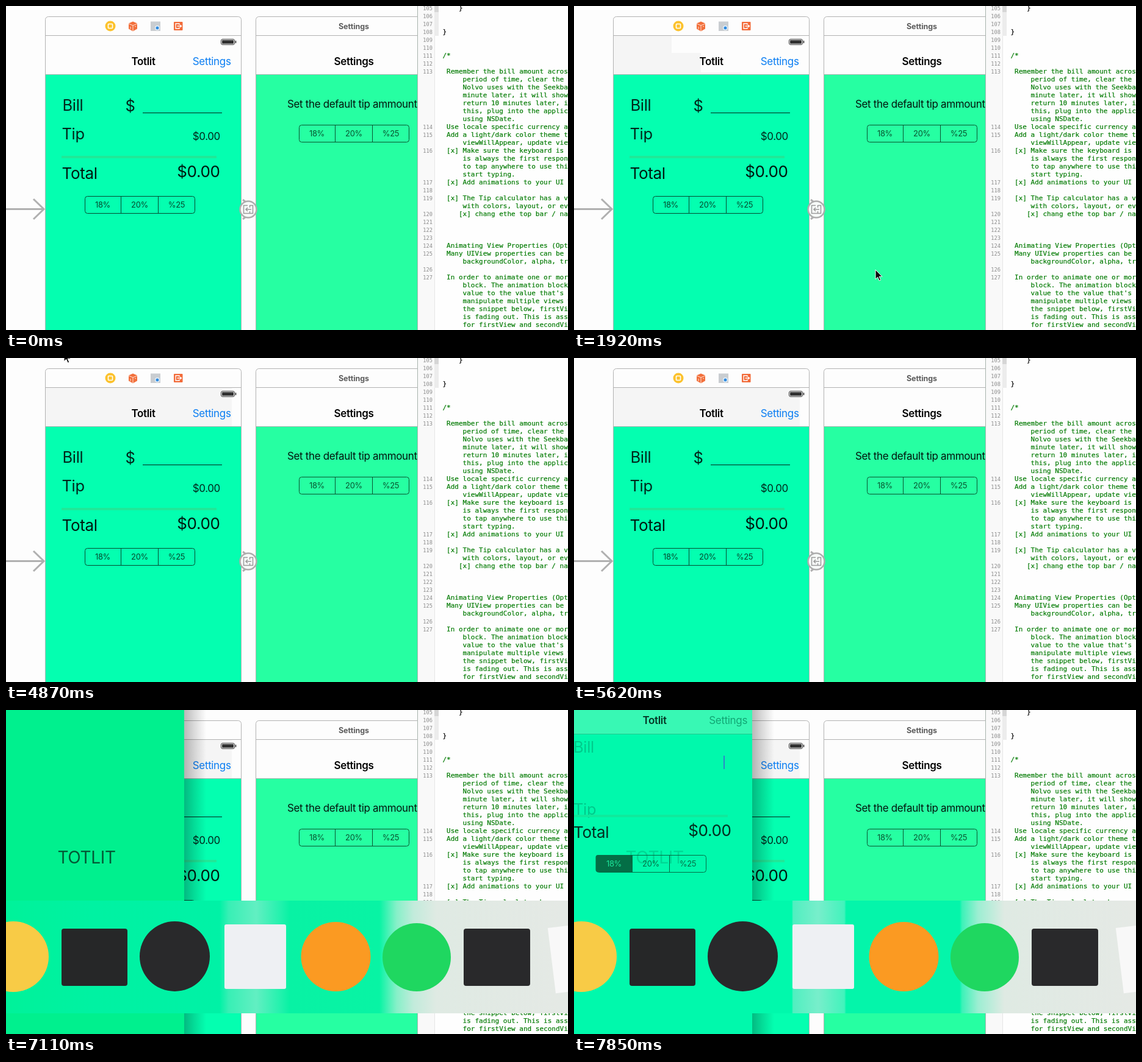
Write an HTML page that moves like this. It is 921 px wide and 532 px high and loops after 7.99 s.

```html
<!DOCTYPE html>
<html lang="en">
<head>
<meta charset="utf-8">
<title>Tip calculator storyboard</title>
<style>
  html, body { margin: 0; width: 100%; height: 100%; overflow: hidden; background: #fdfdfd; }
  svg { display: block; position: absolute; left: 0; top: 0; }
  text { font-family: Inter, "Open Sans", sans-serif; letter-spacing: -.35px; white-space: pre; }
  .code { font: 11px "DejaVu Sans Mono", monospace; letter-spacing: 0; fill: #007a00; stroke: #007a00; stroke-width: .2px; }
  .num { font: 8.7px "DejaVu Sans Mono", monospace; letter-spacing: 0; fill: #8c8c8c; }
  .bold { font-weight: 600; }
  .header { font-weight: 700; letter-spacing: -.1px; }
</style>
</head>
<body>
<svg id="stage" width="921" height="532" viewBox="0 0 921 532"></svg>
<script>
const LOOP = 7990;
const INK = '#00261a';

const rect = (x, y, w, h, fill, extra = '') =>
  `<rect x="${x}" y="${y}" width="${w}" height="${h}" fill="${fill}" ${extra}/>`;
const circle = (x, y, r, fill, extra = '') =>
  `<circle cx="${x}" cy="${y}" r="${r}" fill="${fill}" ${extra}/>`;
const path = (d, stroke, width = 1, fill = 'none', extra = '') =>
  `<path d="${d}" stroke="${stroke}" stroke-width="${width}" fill="${fill}" ${extra}/>`;
const text = (x, y, size, str, fill = INK, anchor = 'start', cls = '') =>
  `<text x="${x}" y="${y}" font-size="${size}" fill="${fill}" text-anchor="${anchor}" class="${cls}">${str}</text>`;
const group = (id, body, extra = '') => `<g id="${id}" ${extra}>${body}</g>`;
const gradient = (id, stops, width = 921) =>
  `<linearGradient id="${id}" gradientUnits="userSpaceOnUse" x1="0" y1="0" x2="${width}" y2="0">` +
  stops.map(([x, color]) => `<stop offset="${x / width}" stop-color="${color}"/>`).join('') +
  '</linearGradient>';

function segments(x, y, ink, selected) {
  const first = selected
    ? path(`M${x + 59.5} ${y}v28h-56a4 4 0 0 1-4-4v-20a4 4 0 0 1 4-4z`, 'none', 0, ink) : '';
  const labels = ['18%', '20%', '%25'].map((s, i) =>
    text(x + 29.5 + i * 60.5, y + 18.8, 13, s, selected && !i ? '#1de69b' : ink, 'middle')).join('');
  return first + rect(x + .5, y + .5, 180, 28, 'none', `rx="4" stroke="${ink}"`) +
    path(`M${x + 59.5} ${y}v29M${x + 120.5} ${y}v29`, ink) + labels;
}

function sceneFrame(x, width, green) {
  return path(`M${x} 532V22.5a5 5 0 0 1 5-5h${width - 10}a5 5 0 0 1 5 5V532`, '#b2b2b2', 1, '#fdfdfd') +
    path(`M${x} 48.5h${width}`, '#b2b2b2') +
    rect(x + .5, 113, width - 1, 419, green);
}
const navLine = (x, width) => path(`M${x} 112.5h${width}`, '#b2b2b2');

const toolbar =
  circle(171, 33, 8.5, '#fcc22d') +
  rect(167.5, 29.5, 7, 7, '#fcc22d', 'stroke="#fff" stroke-width="1.6" rx="1"') +
  path('M208 25.5l7 3v9l-7 4-7-4v-9z', 'none', 0, '#f2703c') +
  path('M201 29l7 3 7-3M208 32v9M204 34v4M211 34l2-1', '#ffe3d6') +
  rect(237, 25.5, 16, 15.5, '#c9cdd1') +
  circle(248, 36, 3.2, '#2f8be0', 'stroke="#e7f2fb" stroke-width="1.4"') +
  rect(275, 26, 14.5, 14, '#f26a38', 'rx="1"') +
  path('M284 31v-2h-6v8h6v-2M280.5 33h7M285.5 31l2 2-2 2', '#fff', 1.3);

const battery =
  rect(352.5, 54.5, 22, 9, '#fff', 'rx="2.5" stroke="#333"') +
  rect(354, 56, 19, 6, '#333', 'rx="1"') +
  path('M376.5 57v4', '#333', 1.5);

const navTint = '#f5f5f5';
const tipScene =
  sceneFrame(64.5, 321, '#04ffb0') +
  [[65, 49, 95, 64, 1], [160, 77, 48, 36, 2], [208, 109, 65, 4, 3],
   [249, 49, 121, 64, 20], [203, 49, 46, 64, 21], [160, 49, 43, 64, 22]]
    .map(([x, y, w, h, from]) => rect(x, y, w, h, navTint, `data-from="${from}"`)).join('') +
  navLine(64.5, 321) + toolbar + battery +
  text(225, 97, 17, 'Totlit', '#000', 'middle', 'bold') +
  text(368.5, 97, 17, 'Settings', '#0a7df2', 'end') +
  text(92.5, 172, 25.5, 'Bill') + text(195.5, 173, 25.5, '$') +
  path('M224 175.5h130', INK) +
  text(91.5, 219, 25.5, 'Tip') + text(351, 220, 17, '$0.00', INK, 'end') +
  rect(91, 246, 254, 4, '#20e898') +
  text(91.5, 283.5, 26, 'Total', '#001a10') +
  text(350.5, 281, 26, '$0.00', '#001a10', 'end') +
  segments(129, 312, '#044a2f');

const settingsScene =
  sceneFrame(409.5, 321, '#26ffa2') + navLine(409.5, 321) +
  text(570, 38, 12.5, 'Settings', '#5c5c5c', 'middle', 'header') +
  text(570, 97, 17, 'Settings', '#000', 'middle', 'bold') +
  text(461, 166.5, 17, 'Set the default tip ammount', '#03140c') +
  segments(480, 195, '#085430');

const connectors =
  path('M0 333.5h60M45 317l17 16.5-17 16.5', '#b0b0b0', 3) +
  path('M388 318l4 3M388 350l4-3', '#b0b0b0', 3) +
  circle(397, 334, 13.5, '#f7faf8', 'stroke="#adadad" stroke-width="2.5"') +
  path('M396 327.5h-6.5v13h15v-13h-5M393 334h9M396 331l-3 3 3 3M399.5 327v4M399.5 337v4', '#9b9b9b', 1.5);

// Each entry: line number (0 for a wrapped line), column, text
const lines = [
  [105, 4, '}'], [106], [107], [108, 0, '}'], [109], [110], [111, 0, '/*'], [112],
  [113, 1, 'Remember the bill amount across'], [0, 5, 'period of time, clear the b'],
  [0, 5, 'Nolvo uses with the Seekbar'], [0, 5, 'minute later, it will show '],
  [0, 5, 'return 10 minutes later, it'], [0, 5, 'this, plug into the applica'],
  [0, 5, 'using NSDate.'], [114, 1, 'Use locale specific currency an'],
  [115, 1, 'Add a light/dark color theme to'], [0, 5, 'viewWillAppear, update view'],
  [116, 1, '[x] Make sure the keyboard is a'], [0, 5, 'is always the first respond'],
  [0, 5, 'to tap anywhere to use this'], [0, 5, 'start typing.'],
  [117, 1, '[x] Add animations to your UI'], [118],
  [119, 1, '[x] The Tip calculator has a vi'], [0, 5, 'with colors, layout, or eve'],
  [120, 4, '[x] chang ethe top bar / nav'], [121], [122], [123],
  [124, 1, 'Animating View Properties (Opti'], [125, 1, 'Many UIView properties can be a'],
  [0, 5, 'backgroundColor, alpha, tra'], [126], [127, 1, 'In order to animate one or more'],
  [0, 5, 'block. The animation block '], [0, 5, 'value to the value that\'s s'],
  [0, 5, 'manipulate multiple views w'], [0, 5, 'the snippet below, firstVie'],
  [0, 5, 'is fading out. This is assu'], [0, 5, 'for firstView and secondVie']
];

const editor =
  rect(674, 0, 247, 532, '#fefefe') + rect(675, 0, 27, 532, '#f9f9f9') +
  path('M674.5 0v532', '#a8b3ad') + path('M702.5 0v532', '#e6e6e6') +
  rect(702, 0, 7, 49, '#ececec') + rect(702, 0, 7, 10, '#d6d6d6') +
  lines.map(([num, col = 0, str = ''], i) => {
    const y = 7 + 13 * i;
    return (num ? text(699, y - .4, '', num, '', 'end', 'num') : '') +
      `<text class="code" x="${715.5 + col * 6.62}" y="${y}" ${str === '}' ? 'style="fill:#000;stroke:#000"' : ''}>${str}</text>`;
  }).join('');

const APP_GREEN = '#00f9ac';
const simApp =
  rect(0, 0, 292, 532, APP_GREEN) + rect(0, 0, 292, 39, '#38f8b4') +
  path('M0 39.5h292', '#22c98f') +
  text(132, 23, 17, 'Totlit', '#053524', 'middle', 'bold') +
  text(284, 23, 17, 'Settings', '#12a674', 'end') +
  `<g opacity=".22">${text(-1, 70, 25.5, 'Bill')}${text(-1, 172, 25.5, 'Tip')}</g>` +
  rect(0, 172, 252, 4, '#10e99c') +
  path('M246 75v22', '#2d87c8', 2) +
  text(-1, 210, 26, 'Total', '#032e1f') + text(257.5, 207, 26, '$0.00', '#032e1f', 'end') +
  segments(36, 238, '#046e46', true);

const simulator =
  rect(292, 0, 36, 532, 'url(#shade)') + rect(0, 0, 292, 532, '#00f08e') +
  group('app', simApp) +
  group('splash', text(132, 251.5, 28, 'TOTLIT', '#045a36', 'middle'));

const paleEnd = [[705, '#dfeae3'], [921, '#e5e9e5']];
const softEdge = [[612, '#08f4a4'], [640, '#86f0c8'], [668, '#c2ebdb'], ...paleEnd];
const defs =
  gradient('dock0', [[0, '#f1f8f4'], [35, '#e3f7ed'], [75, '#62f3be'], [105, '#00f0aa'], [335, '#00f0aa'],
    [362, '#60f3c5'], [400, '#9ff5d8'], [445, '#4df3ba'], [462, '#08f2a4'], ...softEdge]) +
  gradient('dock1', [[0, '#00f29a'], [140, '#00f2a2'], [350, '#00f2a6'], [365, '#38efb5'],
    [410, '#62efc2'], [450, '#22f2ad'], [465, '#08f2a4'], ...softEdge]) +
  gradient('dock2', [[0, APP_GREEN], [357, APP_GREEN], [359, '#50efc0'], [400, '#78eecb'],
    [443, '#42f3bc'], [446, '#04f5aa'], [632, '#04f5aa'], [636, '#3cf2b8'], [662, '#9ceed2'], ...paleEnd]) +
  '<linearGradient id="shade"><stop stop-opacity=".27"/><stop offset=".45" stop-opacity=".14"/>' +
  '<stop offset="1" stop-opacity="0"/></linearGradient>';

const dock =
  rect(0, 313, 921, 185, 'url(#dock0)', 'id="dockBack"') +
  circle(12, 405, 58, '#f8cb46') +
  rect(91, 359, 108, 94, '#262728', 'rx="4"') +
  circle(276.5, 404.5, 57.5, '#29292b') +
  rect(358, 352, 101, 106, '#eef0f3', 'rx="3"') +
  circle(540.5, 405, 57, '#fb9a22') +
  circle(673, 406, 56, '#1fd760') +
  rect(750, 359, 109, 94, '#29292b', 'rx="4"') +
  rect(894, 352, 100, 108, '#f8f8f8', 'transform="rotate(-7 940 406)"');

const pointer = path('M0 0V15.5L3.7 12.2 6.2 18 8.7 17 6.2 11.2H11Z', '#fff', 1, '#0a0a0a');

const $ = id => document.getElementById(id);
$('stage').innerHTML = `<defs>${defs}</defs>` + rect(0, 0, 921, 532, '#fdfdfd') +
  tipScene + settingsScene + connectors + editor +
  group('ghost', pointer, 'transform="translate(252 64)"') + group('cursor', pointer) +
  group('simulator', simulator) + group('dock', dock);

const STEP = 147.6;
const trail = [
  [64, 42], [141, 80], [189, 112], [254, 160], [276, 195], [293, 222], [305, 246], [313, 265],
  [340, 292], [376, 325], [421, 367], [466, 408], [494, 433], [495, 433], [495, 433], [496, 433],
  [516, 441], [510, 425], [450, 300], [351, 140], [252, 64], [206, 47], [125, 14], [82, 3],
  [40, 20], [95, -8]
];
const tinted = [...document.querySelectorAll('[data-from]')];
const show = (el, on) => { el.style.display = on ? '' : 'none'; };

function draw(t) {
  const step = Math.floor((t - 139) / STEP);
  show($('cursor'), step >= 0 && t < 5620);
  if (step >= 0) {
    const [x, y] = trail[Math.min(step, trail.length - 1)];
    const lift = 2 * Math.max(0, step - 31);
    $('cursor').setAttribute('transform', `translate(${x} ${y - lift})`);
  }
  show($('ghost'), step === 21);
  tinted.forEach(el => show(el, step >= +el.dataset.from));

  show($('dock'), t >= 6670);
  show($('simulator'), t >= 6960);
  const fade = t < 7560 ? 0 : t < 7705 ? .35 : t < 7850 ? .7 : 1;
  $('app').setAttribute('opacity', fade);
  $('splash').setAttribute('opacity', 1 - .8 * fade);
  $('dockBack').setAttribute('fill', `url(#dock${t < 6960 ? 0 : t < 7560 ? 1 : 2})`);
}

const start = performance.now();
function tick() {
  draw((performance.now() - start) % LOOP);
  requestAnimationFrame(tick);
}
tick();
</script>
</body>
</html>
```
